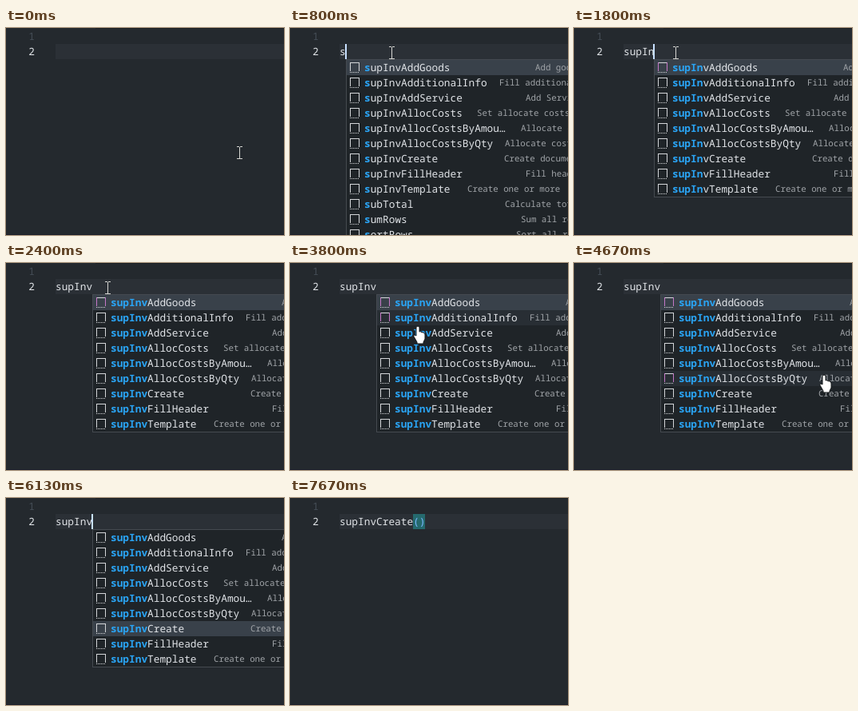
These frames come from a looping animation (348 by 259 pixels, 7740 ms). An HTML page with a canvas:

```html
<!DOCTYPE html>
<html lang="en">
<head>
<meta charset="utf-8">
<title>Snippet completion</title>
<style>
html, body { margin: 0; width: 100%; height: 100%; overflow: hidden; background: #24292e; }
canvas { display: block; }
</style>
</head>
<body>
<canvas id="stage" width="348" height="259"></canvas>
<script>
const ctx = document.getElementById('stage').getContext('2d');
const LOOP = 7740, LINE = 19, CHAR = 7.68, CODE_X = 62, LIST_Y = 40;
const MONO = '"Noto Sans Mono", "DejaVu Sans Mono", monospace';
const CODE_FONT = `12.8px ${MONO}`, MATCH_FONT = `bold ${CODE_FONT}`, DETAIL_FONT = `500 10.75px ${MONO}`;
const FG = '#e1e4e8';

// label, detail, detail offset from the label's left edge
const ITEMS = [
  ['supInvAddGoods', 'Add goods', 214],
  ['supInvAdditionalInfo', 'Fill additional info', 169],
  ['supInvAddService', 'Add Service', 202],
  ['supInvAllocCosts', 'Set allocate costs', 141],
  ['supInvAllocCostsByAmou…', 'Allocate costs', 196],
  ['supInvAllocCostsByQty', 'Allocate costs by', 176],
  ['supInvCreate', 'Create document', 175],
  ['supInvFillHeader', 'Fill header', 202],
  ['supInvTemplate', 'Create one or more', 129],
  ['subTotal', 'Calculate total', 176],
  ['sumRows', 'Sum all rows', 196],
  ['sortRows', 'Sort all rows', 190],
];

// [time, value]: each value holds until the next time
const TYPED = [[0, ''], [800, 's'], [1000, 'su'], [1200, 'sup'], [1600, 'supI'], [1800, 'supIn'],
  [1870, 'supInv'], [6330, 'supInvCreate()']];
const SELECTED = [[0, 0], [5400, 1], [5530, 2], [5730, 3], [5870, 4], [6000, 5], [6130, 6]];
const CARET = [[0, 0], [270, 1], [2400, 0], [2930, 1], [3460, 0], [4000, 1], [4530, 0], [4930, 1],
  [5460, 0], [5930, 1], [6870, 0], [7330, 1], [7670, 0]];

// pointer path: [tick, x, y], 15 ticks per second
const POINTER = [[0, 292, 156], [5, 127, 31], [50, 127, 31], [57, 160, 79], [62, 195, 165],
  [66, 250, 195], [70, 313, 140], [74, 200, 62], [81, 200, 62]];

const HAND = new Path2D('M-2 1Q0-1 2 1V7Q4 6 5 8Q7 7 8 9Q9 9 9 11V16L7 20V22H-1V20L-5 13Q-6 10-2 12Z');

const valueAt = (track, t) => track.findLast(([start]) => start <= t)[1];

function pointerAt(tick) {
  const i = POINTER.findLastIndex(p => p[0] <= tick);
  const [t0, x0, y0] = POINTER[i], [t1, x1, y1] = POINTER[i + 1];
  const k = (tick - t0) / (t1 - t0);
  return { x: Math.round(x0 + (x1 - x0) * k), y: Math.round(y0 + (y1 - y0) * k) };
}

function rect(x, y, w, h, color) {
  ctx.fillStyle = color;
  ctx.fillRect(x, y, w, h);
}

function text(str, x, y, color = FG, font = CODE_FONT) {
  ctx.font = font;
  ctx.textRendering = 'geometricPrecision';
  ctx.fillStyle = color;
  ctx.fillText(str, x, y);
}

function drawIcon(x, y, color) {
  rect(x, y, 12, 1, '#d4d6d9');
  rect(x, y, 1, 11, color);
  rect(x + 11, y, 1, 11, color);
  for (let i = 0; i < 12; i += 2) rect(x + i, y + 12, 1, 1, '#d4d6d9');
}

function drawList(typed, selected, hovered, tinted) {
  const left = Math.round(CODE_X + typed.length * CHAR);
  const rows = ITEMS.slice(0, [12, 11][typed.length - 1] ?? 9);
  rect(left, LIST_Y - 1, 400, rows.length * LINE + 2, '#454a50');
  rect(left + 1, LIST_Y, 400, rows.length * LINE, '#1f2428');
  rows.forEach(([label, detail, offset], i) => {
    const y = LIST_Y + i * LINE, x = left + 23, active = i === selected || i === hovered;
    if (active) rect(left + 1, y, 400, LINE, i === selected ? '#39414a' : '#282e34');
    drawIcon(left + 5, y + 3, active && tinted ? '#c678c8' : '#d4d6d9');
    const matched = [...typed].findIndex((c, k) => c !== label[k]);
    const split = matched < 0 ? typed.length : matched;
    text(label.slice(0, split), x, y + 14, '#2aa4f4', MATCH_FONT);
    text(label.slice(split), x + split * CHAR, y + 14);
    text(detail, x + offset, y + 13, '#a0a4a8', DETAIL_FONT);
  });
}

function drawBeam(x, y) {
  const color = '#d6d6d2';
  rect(x, y - 7, 1, 15, color);
  for (const edge of [y - 8, y + 7]) {
    rect(x - 3, edge, 3, 1, color);
    rect(x + 1, edge, 3, 1, color);
  }
}

function drawHand(x, y) {
  ctx.save();
  ctx.translate(x, y);
  ctx.fillStyle = '#fff';
  ctx.strokeStyle = '#15181b';
  ctx.fill(HAND);
  ctx.stroke(HAND);
  ctx.restore();
}

function draw(t) {
  const typed = valueAt(TYPED, t), done = t >= 6330;
  rect(0, 0, 348, 259, '#24292e');
  rect(112, 0, 236, 1, '#1b1f23');
  rect(0, 258, 348, 1, '#1d1f2b');
  rect(CODE_X, 20, 286, LINE, '#2b3036');
  text('1', 28.3, 15, '#444d56');
  text('2', 28.3, 34);

  if (t >= 6400) rect(154, 20, 15, LINE, '#25696d');
  const code = done ? typed.slice(0, -2) : typed;
  text(code, CODE_X, 34);
  if (done) text('()', CODE_X + code.length * CHAR, 34, '#79b8ff');
  if (valueAt(CARET, t)) rect(Math.round(CODE_X + typed.length * CHAR) - (typed ? 1 : 0), 20, 2, LINE, '#c8e1ff');

  const pointer = t < 5400 ? pointerAt(Math.floor((t + 5) * 3 / 200)) : null;
  const overList = pointer && typed && pointer.y >= LIST_Y;
  if (typed && !done) {
    const hovered = overList ? Math.floor((pointer.y - 44) / LINE) : -1;
    drawList(typed, valueAt(SELECTED, t), hovered, t >= 1800 && t < 5400);
  }
  if (pointer) (overList ? drawHand : drawBeam)(pointer.x, pointer.y);
}

function frame() {
  draw(performance.now() % LOOP);
  requestAnimationFrame(frame);
}
frame();
</script>
</body>
</html>
```
